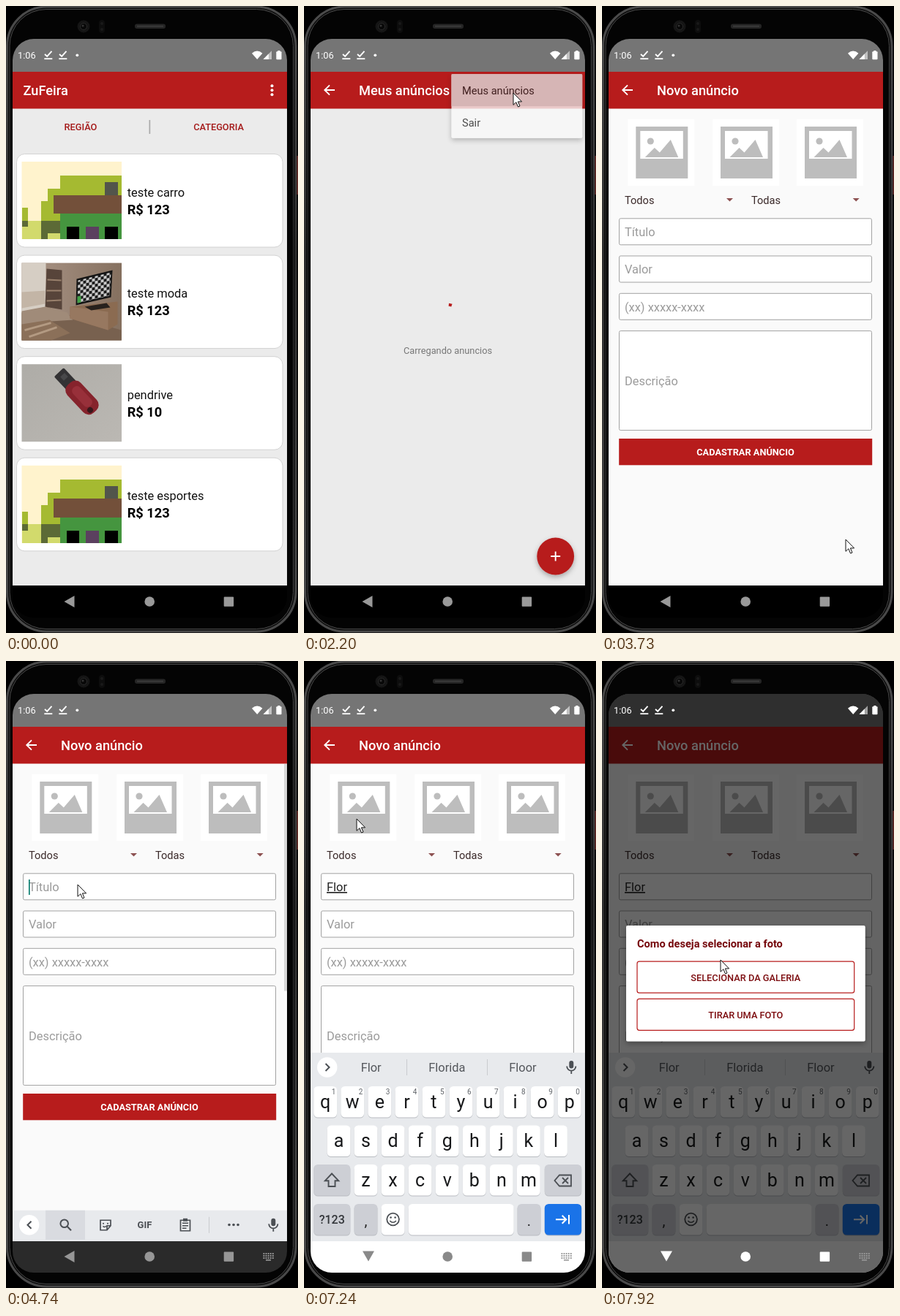
Write an HTML page that moves like this. It is 399 px wide and 858 px high and loops after 8 s.

```html
<!DOCTYPE html>
<html lang="pt">
<head>
<meta charset="utf-8">
<title>App de anúncios</title>
<style>
  html, body { margin: 0; width: 100%; height: 100%; overflow: hidden; background: #000; }
  svg { display: block; width: 399px; height: 858px; font-family: Roboto, sans-serif; }
  text { white-space: pre; }
</style>
</head>
<body>
<svg id="stage" viewBox="0 0 399 858" xmlns="http://www.w3.org/2000/svg"></svg>
<script>
const RED = '#b71c1c';
const stage = document.getElementById('stage');

const rect = (x, y, w, h, fill, more = '') =>
  `<rect x="${x}" y="${y}" width="${w}" height="${h}" fill="${fill}" ${more}/>`;
const circle = (x, y, r, fill, more = '') =>
  `<circle cx="${x}" cy="${y}" r="${r}" fill="${fill}" ${more}/>`;
const shape = (d, fill, more = '') => `<path d="${d}" fill="${fill}" ${more}/>`;
const line = (d, color, w = 2) => `<path d="${d}" fill="none" stroke="${color}" stroke-width="${w}"/>`;
const text = (x, y, s, size, fill, more = '') =>
  `<text x="${x}" y="${y}" font-size="${size}" fill="${fill}" ${more}>${s}</text>`;
const MID = 'text-anchor="middle"';
const MEDIUM = 'font-weight="500"';
const BOLD = 'font-weight="700"';
const group = (id, body, more = '') => `<g id="${id}" ${more}>${body}</g>`;

const appBar = title => rect(9, 90, 375, 50.5, RED) +
  line('M42 115H28.5M35 108.3L28.3 115L35 121.7', '#fff', 1.9) +
  text(75, 122, title, 18.24, '#fff', MEDIUM);

// Pictures on the cards, in a 136.5 x 106 box
function house() {
  const c = 8.75;
  const cells = (x, y, w, h, fill) => rect(x * c, y * c, w * c, h * c, fill);
  return rect(0, 0, 136.5, 106, '#fff3cd') +
    `<g shape-rendering="crispEdges">` +
    cells(6, 2.2, 9.6, 7, '#a5ba31') + cells(4, 4.2, 3, 5, '#a5ba31') + cells(3, 6.2, 3, 5, '#a5ba31') +
    cells(0, 7.2, 1, 2, '#a5ba31') + cells(0, 9.2, 6, 2.92, '#d2da6c') +
    cells(0, 9.2, 1, 1, '#5c6a36') + cells(3, 9.2, 3, 2, '#5c6a36') + cells(3, 11.1, 1, 1, '#5c6a36') +
    cells(6, 8.1, 9.6, 4, '#45953f') + cells(5, 5.2, 10.6, 2.95, '#73503a') + cells(13, 3.2, 2, 2, '#52554b') +
    cells(7, 10.2, 2, 1.92, '#000') + cells(10, 10.2, 2, 1.92, '#5b405f') + cells(13, 10.2, 2, 1.92, '#000') +
    `</g>`;
}
function room() {
  return rect(0, 0, 136.5, 106, 'url(#wall)') + rect(0, 0, 33, 70, '#d6cec4') +
    shape('M0 40L32 38V56L0 62Z', '#c3b5a6') +
    shape('M0 68L34 60L66 72L136 92V106H0Z', '#78614f') +
    shape('M0 66L32 60L62 68L70 78L40 80L0 88Z', '#a08b79') +
    shape('M0 84L38 78L66 96L40 106H0Z', '#8b7059') + line('M4 92L40 82M10 101L48 88', '#b39a82', 3) +
    shape('M34 8L55 10V64L32 60Z', '#57443a') +
    line('M35 23L54 24M34 38L54 38M34 52L54 51', '#99806c', 2) +
    shape('M66 60L131 53V84L118 92L66 76Z', '#8b6b51') + shape('M66 60L118 67V92L66 76Z', '#977860') +
    shape('M75 22L124 10L122 47L74 58Z', '#141414') +
    shape('M77 24L122 13L120 45L76 55Z', 'url(#check)') +
    shape('M76 46L81 45V54L76 55Z', '#43a047') + shape('M86 60L116 55L121 61L95 65Z', '#27211d');
}
function stick() {
  return rect(0, 0, 136.5, 106, 'url(#desk)') +
    `<g transform="translate(76 38) rotate(47)">` +
    rect(-37, -9, 25, 18, '#333234', 'rx="2"') + rect(-31, -5, 7, 8, '#48484a') +
    rect(-16, -12, 52, 25, '#86232c', 'rx="10"') + rect(-8, -7, 34, 13, '#98303a', 'rx="6"') +
    circle(30, 4, 4, '#37171b') + `</g>`;
}
function card(i, name, price, picture) {
  return `<g transform="translate(0 ${i * 138.6})">` +
    rect(14.5, 202.5, 363.5, 127.5, '#fff', 'rx="11" stroke="#d2d2d2"') +
    `<g transform="translate(21.5 213)">${picture}</g>` +
    text(165.7, 260.6, name, 16.4, '#111') + text(165.7, 284.6, 'R$ ' + price, 18.24, '#000', BOLD) + `</g>`;
}

const home = rect(9, 90, 375, 703, '#ebebeb') + rect(9, 90, 375, 50.5, RED) +
  text(23.5, 122, 'ZuFeira', 18.24, '#fff', MEDIUM) +
  [109.2, 115.2, 121.2].map(y => circle(363.5, y, 2, '#fff')).join('') +
  text(102, 170, 'REGIÃO', 12.77, '#a51b1b', MID + ' ' + MEDIUM) +
  text(290.5, 170, 'CATEGORIA', 12.77, '#a51b1b', MID + ' ' + MEDIUM) + rect(195.5, 156, 1.7, 19, '#aaa') +
  card(0, 'teste carro', 123, house()) + card(1, 'teste moda', 123, room()) +
  card(2, 'pendrive', 10, stick()) + card(3, 'teste esportes', 123, house());

const ads = rect(9, 90, 375, 703, '#ebebeb') + appBar('Meus anúncios') +
  group('loading',
    `<circle id="arc" cx="196" cy="426" r="17.4" fill="none" stroke="${RED}" stroke-width="4" pathLength="360"/>` +
    text(196.5, 475.5, 'Carregando anuncios', 12.77, '#777', MID)) +
  circle(343.7, 753, 25.4, RED, 'filter="url(#shadow)"') +
  group('press', circle(343.7, 753, 25.4, '#fff')) +
  line('M343.7 746.5V759.5M337.2 753H350.2', '#fff', 1.9);

function photoSlot(x) {
  return `<g transform="translate(${x} 155)">` + rect(0, 0, 91, 91, '#fff') + rect(11, 10, 71, 71, '#bdbdbd') +
    rect(17, 16, 58.5, 38, '#fff') + circle(31, 30, 4.6, '#bdbdbd') +
    shape('M23.5 52L36.5 39L43.5 45.5L58.5 28L69 52Z', '#bdbdbd') + `</g>`;
}
function field(y, h, base, hint, id) {
  return rect(23.5, y, 345, h, '#fff', 'rx="2" stroke="#a2a2a2"') + text(31, base, hint, 16.4, '#9b9b9b', `id="${id}"`);
}
const arrow = x => shape(`M${x} 263h9l-4.5 4.5z`, '#8c5151');
const form = rect(9, 90, 375, 703, '#fafafa') + appBar('Novo anúncio') +
  [35.3, 151, 266].map(photoSlot).join('') +
  text(31, 270.5, 'Todos', 14.6, '#3b2a2a') + text(204, 270.5, 'Todas', 14.6, '#3b2a2a') + arrow(170) + arrow(342.7) +
  field(290.8, 36, 315, 'Título', 'hint') + field(342, 36, 366.3, 'Valor', 'price') +
  field(393.3, 36, 417.6, '(xx) xxxxx-xxxx', 'phone') + field(444.6, 136, 518.8, 'Descrição', 'about') +
  `<text x="31" y="315" font-size="16.4" fill="#222"><tspan id="marked" text-decoration="underline"></tspan><tspan id="fresh"></tspan></text>` +
  rect(31, 299, 1.6, 21, '#00796b', 'id="caret"') +
  rect(23.2, 592, 346, 36.3, RED) + text(196, 614.8, 'CADASTRAR ANÚNCIO', 12.77, '#fff', MID + ' ' + BOLD) +
  rect(380, 141, 4, 310.5, '#858585', 'id="bar"');

// Keyboard
const INK = '#4b4f54';
const GREY = '#cdcfd5';
const key = (x, y, w, fill = '#fff') =>
  rect(x, y + 1, w, 42.5, '#b9bcc1', 'rx="5.5"') + rect(x, y, w, 42.5, fill, 'rx="5.5"');
const letters = (row, x, y) => [...row].map((c, i) =>
  key(x + i * 37.06, y, 31.8) + text(x + i * 37.06 + 15.9, y + 29.5, c, 25, '#17181a', MID)).join('');
const mic = rect(362.3, 547, 6, 10.5, INK, 'rx="3"') + line('M359.2 554.5a6.1 6.1 0 0 0 12.2 0M365.3 560.5V565', INK, 1.8);
const divider = x => rect(x, 545, 1, 22, '#c9cbcf');
const tools = rect(54, 536, 54, 40, '#d9dbe0') + line('M34.5 551L29.5 556L34.5 561', INK) +
  circle(79.7, 554, 5.3, 'none', `stroke="${INK}" stroke-width="2"`) + line('M83.6 558L89 563.4', INK, 2.2) +
  line('M129 549.5H143V557L138 563H129Z M143 557H138V563', INK, 1.7) +
  circle(133, 554, 1.1, INK) + circle(139, 554, 1.1, INK) + line('M132.5 557.5q2 2.5 4.5 0', INK, 1.4) +
  text(189.5, 560, 'GIF', 13, INK, MID + ' ' + BOLD) +
  line('M238.5 549.5H251.5V564H238.5Z M241 553.5H249M241 557H249M241 560.5H246.5', INK, 1.7) + rect(242, 547, 6, 4, INK) +
  divider(277) + [305, 311, 317].map(x => circle(x, 555.7, 1.8, INK)).join('');
const hints = line('M29.5 551L34.5 556L29.5 561', INK) + divider(140) + divider(250) +
  ['', 'Florida', 'Floor'].map((s, i) => text(91.7 + i * 103.6, 562, s, 16.4, '#54575c', `${MID} id="hint${i}"`)).join('');
const keyboard = rect(9, 536, 375, 258, '#e8eaed') + circle(31.7, 556, 13.7, '#fff') +
  group('tools', tools) + group('hints', hints) + mic +
  letters('qwertyuiop', 13.3, 582) +
  [...'1234567890'].map((d, i) => text(40.5 + i * 37.06, 592.5, d, 10, '#5f6368', MID)).join('') +
  letters('asdfghjkl', 31.6, 635.5) + letters('zxcvbnm', 68.6, 689) +
  key(13.3, 689, 50, GREY) + line('M38 701.5L28.8 711.2H33.5V719H42.5V711.2H47.2Z', INK, 1.9) +
  key(328.8, 689, 50.4, GREY) + line('M349 703.5H365V718.5H349L342.5 711Z M353 707L361 715M361 707L353 715', INK, 1.8) +
  key(13.3, 743, 50, GREY) + text(38.2, 770, '?123', 16, '#33363a', MID + ' ' + MEDIUM) +
  key(68.6, 743, 31.8, GREY) + text(84.5, 773, ',', 20, '#222', MID) +
  key(105.7, 743, 31.8) + circle(121.6, 764, 8.3, 'none', `stroke="${INK}" stroke-width="1.8"`) +
  circle(118.6, 761.5, 1.3, INK) + circle(124.6, 761.5, 1.3, INK) + line('M117.3 766q4.3 4.6 8.6 0', INK, 1.6) +
  key(142.7, 743, 144) + key(291.6, 743, 31.8, GREY) + text(307.5, 773, '.', 20, '#222', MID) +
  key(328.8, 743, 50.4, '#1a73e8') + line('M344 764.3H358M352.7 758.8L358.2 764.3L352.7 769.8M362 758V770.6', '#fff', 2);

const menu = rect(201.5, 93.2, 178.7, 87.5, '#fafafa', 'rx="2" filter="url(#shadow)"') +
  rect(201.5, 93.2, 178.7, 44, '#dfdfdf', 'id="hover"') +
  text(216, 121, 'Meus anúncios', 14.6, '#222') + text(216, 164.7, 'Sair', 14.6, '#222');

const option = (y, label) => rect(48, y, 296.7, 43, '#fff', `rx="3" stroke="${RED}" stroke-width="1.2"`) +
  text(196.3, y + 26.8, label, 12.77, '#7d0d10', MID + ' ' + MEDIUM);
const dialog = rect(9, 45, 375, 792, '#000', 'opacity=".6"') +
  rect(33, 362, 326.7, 158.5, '#fff', 'rx="2" filter="url(#shadow)"') +
  text(48, 392.3, 'Como deseja selecionar a foto', 14.6, '#76090d', BOLD) +
  option(411.2, 'SELECIONAR DA GALERIA') + option(462.3, 'TIRAR UMA FOTO');

const done = x => line(`M${x} 66L${x + 3.2} 69L${x + 9.5} 61.8`, '#fff', 1.9) + rect(x - 0.7, 71.3, 11, 1.8, '#fff');
const status = text(16, 72.4, '1:06', 12.77, '#fff') + done(53) + done(73) + circle(97.3, 67.3, 1.9, '#fff') +
  shape('M336 64.8Q343.2 58 350.4 64.8L343.2 73Z', '#fff') +
  shape('M351.5 73L363 61.3V73Z', '#fff', 'opacity=".55"') + shape('M351.5 73L358.8 65.6V73Z', '#fff') +
  rect(369.3, 62.3, 7.2, 11, '#fff', 'rx="1"') + rect(371.3, 61, 3.2, 2, '#fff');

const nav = shape('M79.5 815L93.5 807V823Z', 'currentColor', 'id="back"') + circle(196.2, 815, 6.8, 'currentColor') +
  rect(297.7, 808.4, 13.4, 13.4, 'currentColor', 'rx="1"') +
  group('keys', [811, 814, 817].map(y => `<path d="M351.5 ${y}H366" stroke="#999" stroke-width="1.8" stroke-dasharray="1.8 1.3"/>`).join('') +
    rect(355, 819, 7, 1.6, '#999'));

const phone = rect(0, 0, 399, 858, '#000') + rect(397, 205, 2, 53, '#5b211d') +
  rect(1.5, 1, 394.5, 855, '#0c0c0c', 'rx="54" stroke="url(#rim)" stroke-width="3"') +
  rect(5, 4.5, 387.5, 848, '#040404', 'rx="50" stroke="url(#rim)" stroke-width="1"') +
  circle(106, 28, 8.5, '#151515') + circle(106, 28, 4.5, '#080808', 'stroke="#2a2a2a"') + circle(105, 27, 1.5, '#343434') +
  rect(127, 19, 8, 18, '#0d0d0d', 'rx="4"') + circle(131, 24, 2, '#191919') + circle(131, 32, 2, '#191919') +
  rect(176, 24.5, 42, 6.5, '#252525', 'rx="3"') + line('M179 27.8H215', '#3a3a3a', 2);

stage.innerHTML = `<defs>
  <clipPath id="screen"><rect x="9" y="45" width="375" height="792" rx="29"/></clipPath>
  <clipPath id="above"><rect x="9" y="45" width="375" height="749"/></clipPath>
  <pattern id="check" width="8" height="8" patternUnits="userSpaceOnUse" patternTransform="skewY(-13)">
    <path d="M0 0H8V8H0Z" fill="#c8c8c8"/><path d="M0 0H4V8H8V4H0Z" fill="#1d1d1d"/></pattern>
  <linearGradient id="wall"><stop offset=".3" stop-color="#a08b7c"/><stop offset="1" stop-color="#85705f"/></linearGradient>
  <linearGradient id="desk" x2="1" y2="1"><stop stop-color="#aeaca7"/><stop offset="1" stop-color="#bbb8b3"/></linearGradient>
  <linearGradient id="rim" x2="0" y2="1"><stop stop-color="#4c4c4c"/><stop offset=".4" stop-color="#2c2c2c"/><stop offset="1" stop-color="#4a4a4a"/></linearGradient>
  <filter id="shadow" x="-20%" y="-20%" width="140%" height="150%"><feDropShadow dx="0" dy="3" stdDeviation="3.5" flood-opacity=".3"/></filter>
  </defs>` + phone +
  `<g clip-path="url(#screen)">` + rect(9, 45, 375, 792, '#000') + rect(9, 45, 375, 45, '#757575') +
  group('home', home) + group('ads', ads) + group('form', form) +
  group('ripple', circle(363, 113.5, 16, '#000')) + group('menu', menu) +
  `<g clip-path="url(#above)">${group('keyboard', keyboard)}</g>` + rect(9, 794, 375, 43, '#fff', 'id="navBg"') +
  group('dialog', dialog) + status + group('nav', nav) + `</g>` +
  group('cursor', shape('M0 0V16.3L3.9 12.7L6.5 19L9 18L6.4 11.9H11.6Z', '#fff', 'stroke="#111" stroke-width="1" stroke-linejoin="round"'));

const el = {};
stage.querySelectorAll('[id]').forEach(n => el[n.id] = n);
const show = (id, on) => el[id].setAttribute('display', on ? 'inline' : 'none');
const fade = (id, v) => { el[id].setAttribute('opacity', v); show(id, v > 0); };
const ramp = (t, a, b) => Math.min(1, Math.max(0, (t - a) / (b - a)));
const smooth = v => v * v * (3 - 2 * v);

const LOOP = 8000, STEP = 110.05;
// Pointer stops: time, x, y
const track = [
  [100, 214, 703], [870, 342, 134], [980, 342, 134], [1210, 359, 98], [1600, 359, 98], [1900, 286, 119],
  [2290, 286, 119], [2640, 216, 260], [2740, 216, 260], [3520, 333, 730], [3740, 333, 730], [4510, 98, 306],
  [4720, 98, 306], [5050, 85, 239], [6930, 85, 239], [7210, 72, 216], [7370, 72, 216], [7580, 70, 278],
  [7700, 70, 278], [7910, 162, 409], [8000, 162, 409]
];
function pointer(t) {
  const i = Math.max(1, track.findIndex(p => p[0] >= t));
  const [a, x, y] = track[i - 1], [b, u, v] = track[i];
  const k = smooth(ramp(t, a, b));
  return `translate(${x + (u - x) * k} ${y + (v - y) * k})`;
}

function draw(t) {
  const q = Math.min(LOOP, 100 + Math.floor((t - 85) / STEP) * STEP);

  show('home', t < 2190);
  show('ads', t >= 2190 && t < 3725);
  show('form', t >= 3725);

  show('cursor', t >= 100);
  el.cursor.setAttribute('transform', pointer(q));

  fade('ripple', t < 1435 ? 0 : 0.17 * (1 - ramp(q, 1540, 1760)));
  fade('menu', ramp(q, 1500, 1740) * (1 - ramp(q, 2165, 2285)));
  show('hover', t >= 1970);

  show('loading', t < 2630);
  const spin = Math.max(0, q - 2191);
  el.arc.setAttribute('stroke-dasharray', `${14 + 250 * smooth(ramp(spin, 0, 667))} 360`);
  el.arc.setAttribute('transform', `rotate(${-84 + spin * 0.22} 196 426)`);
  fade('press', 0.25 * ramp(q, 3480, 3620) * (1 - ramp(q, 3620, 3700)));

  const typed = 'Flor'.slice(0, t < 6030 ? 0 : 1 + Math.min(3, Math.floor((t - 6030) / 110)));
  const marks = t < 6590 ? 3 : 4;
  el.marked.textContent = typed.slice(0, marks);
  el.fresh.textContent = typed.slice(marks);
  show('hint', !typed);
  show('caret', t >= 4630 && t < 5510);
  fade('bar', ramp(q, 4690, 4800) * (1 - ramp(q, 5400, 5600)));

  const up = smooth(ramp(q, 4640, 4960));
  show('keyboard', up > 0);
  el.keyboard.setAttribute('transform', `translate(0 ${258 * (1 - up)})`);
  fade('navBg', up);
  show('tools', !typed);
  show('hints', typed);
  el.hint0.textContent = typed;
  show('hint1', t >= 6590);
  show('hint2', t >= 6590);

  const dim = ramp(q, 7365, 7580);
  fade('dialog', dim);
  const tone = Math.round(153 - 16 * up + 118 * dim);
  el.nav.style.color = `rgb(${tone},${tone},${tone})`;
  show('keys', up > 0);
  el.back.setAttribute('transform', `rotate(${-90 * smooth(ramp(q, 4880, 5380))} 87 814)`);
}

const start = performance.now();
function frame() {
  draw((performance.now() - start) % LOOP);
  requestAnimationFrame(frame);
}
frame();
</script>
</body>
</html>
```
